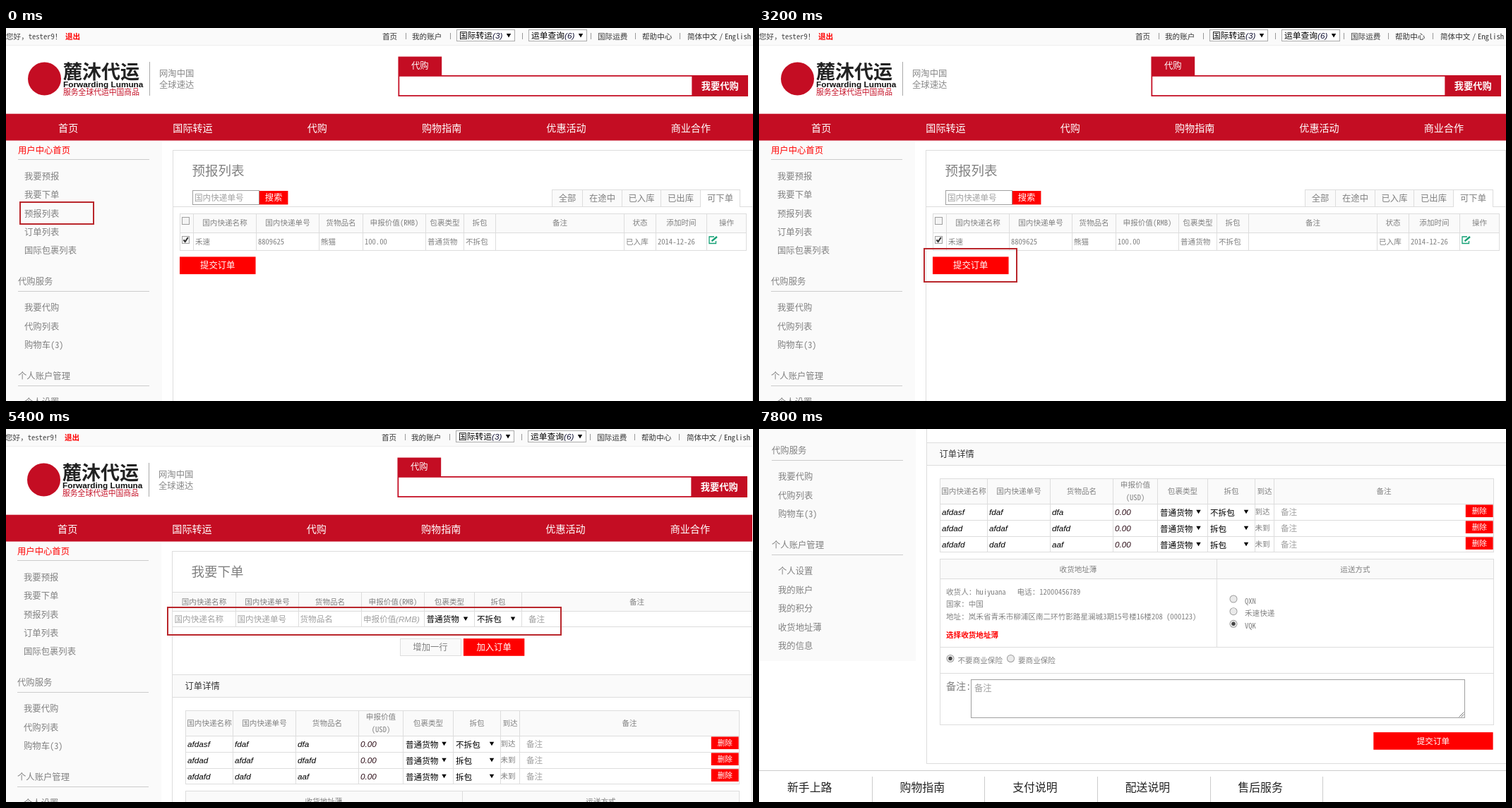
An HTML page with a canvas that plays this animation: 1058x529 px, repeating every 8 s.

```html
<!DOCTYPE html>
<html lang="zh-CN">
<head>
<meta charset="utf-8">
<style>
html, body { margin: 0; width: 100%; height: 100%; overflow: hidden; background: #fff; }
canvas { display: block; }
</style>
</head>
<body>
<canvas id="stage" width="1058" height="529"></canvas>
<script>
const ctx = document.getElementById('stage').getContext('2d');
const MONO = '"Noto Sans Mono CJK SC", "Noto Sans CJK SC", "Noto Sans CJK", monospace';
const SANS = '"Liberation Sans", "Noto Sans CJK SC", "Noto Sans CJK", sans-serif';
const BRAND = '#c40d23', RED = '#f00', GREY = '#808080', HINT = '#a0a0a0';
const LINE = '#ddd', PALE = '#fafafa';
// the web page is 1200 units wide, shown on 1058 pixels
const U = 1058 / 1200;
const S = 12 * U, M = 14 * U, L = 16 * U, FIELD = 11.6;

// y is the visual middle of the line
function text(str, x, y, size = S, color = GREY, { align = 'left', style = '', font = MONO } = {}) {
  ctx.font = `${style} ${size}px ${font}`;
  ctx.textAlign = align;
  ctx.fillStyle = color;
  ctx.fillText(str, x, y + size * 0.38);
}
const mid = (str, x, y, size, color, style) => text(str, x, y, size, color, { align: 'center', style });
const italic = (str, x, y, size, color) => text(str, x, y, size, color, { style: 'italic', font: SANS });

function rect(x0, y0, x1, y1, color) {
  ctx.fillStyle = color;
  ctx.fillRect(x0, y0, x1 - x0, y1 - y0);
}
function frame(x0, y0, x1, y1, color, w = 1) {
  ctx.strokeStyle = color;
  ctx.lineWidth = w;
  ctx.strokeRect(x0 + w / 2, y0 + w / 2, x1 - x0 - w, y1 - y0 - w);
}
const hline = (x0, x1, y, color = LINE) => rect(x0, y, x1, y + 1, color);
const vline = (x, y0, y1, color = LINE) => rect(x, y0, x + 1, y1, color);

// block and button take page units
const block = (x0, y0, x1, y1, color) => rect(x0 * U, y0 * U, x1 * U, y1 * U, color);
function button(label, x, y, w, h, size = M, color = RED, style = '') {
  block(x, y, x + w, y + h, color);
  mid(label, (x + w / 2) * U, (y + h / 2) * U, size, '#fff', style);
}
function grid(xs, ys) {
  const right = xs[xs.length - 1], bottom = ys[ys.length - 1];
  rect(xs[0], ys[0], right, ys[1], PALE);
  ys.forEach(y => hline(xs[0], right + 1, y));
  xs.forEach(x => vline(x, ys[0], bottom + 1));
}
function heads(labels, xs, y) {
  labels.forEach((s, i) => s && mid(s, (xs[i] + xs[i + 1] + 1) / 2, y));
}
function arrow(x, y) {
  ctx.fillStyle = '#000';
  ctx.beginPath();
  ctx.moveTo(x - 3.2, y - 2.5);
  ctx.lineTo(x + 3.2, y - 2.5);
  ctx.lineTo(x, y + 3);
  ctx.fill();
}
function select(label, x, arrowX, y) {
  text(label, x, y, FIELD, '#000');
  arrow(arrowX, y - 1);
}
function checkbox(x, y, on) {
  rect(x - 5, y - 5, x + 6, y + 6, '#f4f4f4');
  frame(x - 5, y - 5, x + 6, y + 6, '#a0a0a0');
  if (!on) return;
  ctx.strokeStyle = '#333';
  ctx.lineWidth = 2;
  ctx.beginPath();
  ctx.moveTo(x - 2.5, y + 0.5);
  ctx.lineTo(x - 0.3, y + 3);
  ctx.lineTo(x + 3.8, y - 3);
  ctx.stroke();
}
function disc(x, y, r, color) {
  ctx.fillStyle = color;
  ctx.beginPath();
  ctx.arc(x, y, r, 0, 7);
  ctx.fill();
}
function radio(x, y, on) {
  disc(x, y, 5.5, '#999');
  disc(x, y, 4.6, '#eaeaea');
  if (on) disc(x, y, 2.7, '#444');
}
function editIcon(x, y) {
  ctx.strokeStyle = '#12a074';
  ctx.lineWidth = 1.3;
  ctx.beginPath();
  ctx.moveTo(x + 8, y - 4.5);
  ctx.lineTo(x + 1, y - 4.5);
  ctx.lineTo(x + 1, y + 5);
  ctx.lineTo(x + 10.5, y + 5);
  ctx.lineTo(x + 10.5, y + 1.5);
  ctx.stroke();
  ctx.lineWidth = 2.4;
  ctx.beginPath();
  ctx.moveTo(x + 4.5, y + 1.8);
  ctx.lineTo(x + 12, y - 4.5);
  ctx.stroke();
}

function topBar() {
  rect(0, 0, 1058, 24, PALE);
  hline(0, 1058, 24, '#eee');
  text('您好，tester9！', 0, 11.5, S, '#444');
  text('退出', 84, 11.5, S, RED, { style: 'bold' });
  const links = [['首页', 533], ['我的账户', 575], ['国际运费', 838], ['帮助中心', 901],
    ['简体中文', 965], ['/', 1010], ['English', 1018]];
  links.forEach(([s, x]) => text(s, x, 11.5, S, '#333'));
  [566, 629, 731, 828, 891, 954].forEach(x => vline(x, 7, 16, '#999'));
  [['国际转运', '(3)', 638], ['运单查询', '(6)', 740]].forEach(([s, n, x]) => {
    rect(x, 2, x + 83, 19, '#fff');
    frame(x, 2, x + 83, 19, '#aaa');
    text(s, x + 4, 11, 11.73, '#000');
    italic(n, x + 51, 11, 11.73, '#113');
    arrow(x + 74, 10.5);
  });
}

function header() {
  topBar();
  disc(54.5, 72, 23.5, BRAND);
  text('麓沐代运', 81, 62, 27, '#222', { style: 'bold' });
  text('Forwarding Lumuna', 81, 80, 11.8, '#111', { style: 'bold', font: SANS });
  text('服务全球代运中国商品', 81, 90.5, 10.8, BRAND);
  vline(203, 48, 96, '#aaa');
  text('网淘中国', 217, 64.5, M, '#888');
  text('全球速达', 217, 80.5, M, '#888');

  button('代购', 630, 46, 70, 30, M, BRAND);
  block(630, 76, 1192, 110, BRAND);
  block(632, 78, 1102, 108, '#fff');
  button('我要代购', 1102, 76, 90, 34, 15 * U, BRAND, 'bold');

  block(0, 138, 1200, 181, BRAND);
  ['首页', '国际转运', '代购', '购物指南', '优惠活动', '商业合作']
    .forEach((s, i) => mid(s, (100 + 200 * i) * U, 141.3, L, '#fff'));
}

function sidebar() {
  rect(0, 160, 221, 658, PALE);
  const groups = [
    [173, '用户中心首页', '我要预报', '我要下单', '预报列表', '订单列表', '国际包裹列表'],
    [359.5, '代购服务', '我要代购', '代购列表', '购物车(3)'],
    [493.5, '个人账户管理', '个人设置', '我的账户', '我的积分', '收货地址薄', '我的信息']
  ];
  groups.forEach(([y, title, ...items], g) => {
    text(title, 17, y, M, g ? GREY : RED);
    hline(17, 203, Math.round(y + 13.4), '#ccc');
    items.forEach((s, i) => text(s, 26, y + 37 + 30 * U * i, M));
  });
}

function panel(title) {
  frame(236, 173, 1058, 804, LINE);
  text(title, 263.5, 202, 21 * U);
}

function listPage() {
  panel('预报列表');
  frame(264, 230, 359, 251, '#a0a0a0');
  text('国内快递单号', 267, 241, FIELD, HINT);
  button('搜索', 407, 262, 46, 22);

  hline(236, 1058, 253);
  const tabs = [773, 816, 872, 927, 983, 1039];
  ['全部', '在途中', '已入库', '已出库', '可下单'].forEach((s, i) => {
    const x0 = tabs[i], x1 = tabs[i + 1] + 1, active = i === 4;
    rect(x0, 229, x1, 254, active ? '#fff' : PALE);
    if (!active) hline(x0, x1, 253);
    hline(x0, x1, 229);
    vline(x0, 229, 254);
    vline(x1 - 1, 229, 254);
    mid(s, (x0 + x1) / 2, 241.5, M);
  });

  const xs = [246, 265, 354, 443, 505, 594, 648, 693, 875, 920, 992, 1048];
  grid(xs, [263, 290, 315]);
  heads(['', '国内快递名称', '国内快递单号', '货物品名', '申报价值(RMB)', '包裹类型', '拆包', '备注',
    '状态', '添加时间', '操作'], xs, 276);
  ['', '禾速', '8809625', '熊猫', '100.00', '普通货物', '不拆包', '', '已入库', '2014-12-26']
    .forEach((s, i) => text(s, xs[i] + 3, 302.5));
  checkbox(254, 273, false);
  checkbox(254, 300, true);
  editIcon(995, 300.5);
  button('提交订单', 279, 368, 122, 28);
}

function entryForm() {
  const xs = [236, 326, 415, 504, 593, 664, 731, 1057], y = 269.5;
  grid(xs, [231, 258, 280]);
  heads(['国内快递名称', '国内快递单号', '货物品名', '申报价值(RMB)', '包裹类型', '拆包', '备注'], xs, 244.5);
  text('国内快递名称', 239.5, y, FIELD, HINT);
  text('国内快递单号', 328.5, y, FIELD, HINT);
  text('货物品名', 417.5, y, FIELD, HINT);
  text('申报价值', 507, y, FIELD, HINT);
  italic('(RMB)', 553, y, 11.73, HINT);
  select('普通货物', 596.5, 652, y + 0.5);
  select('不拆包', 668, 719, y + 0.5);
  text('备注', 741, y, FIELD, HINT);

  rect(559, 297, 646, 322, PALE);
  frame(559, 297, 646, 322, LINE);
  mid('增加一行', 602, 309.5, M);
  button('加入订单', 736, 337, 98, 28);
}

function orderRows() {
  rect(237, 349, 1057, 381, PALE);
  hline(237, 1057, 348);
  hline(237, 1057, 380);
  text('订单详情', 254.5, 364.5, M, '#333');

  const xs = [255, 322, 411, 500, 563, 634, 701, 728, 1039];
  grid(xs, [399, 435, 458, 481, 503]);
  heads(['国内快递名称', '国内快递单号', '货物品名', '', '包裹类型', '拆包', '到达', '备注'], xs, 417);
  mid('申报价值', 532, 408);
  mid('(USD)', 532, 425.5);
  const rows = [
    ['afdasf', 'fdaf', 'dfa', '不拆包', '到达'],
    ['afdad', 'afdaf', 'dfafd', '拆包', '未到'],
    ['afdafd', 'dafd', 'aaf', '拆包', '未到']
  ];
  rows.forEach(([name, code, goods, unpack, state], i) => {
    const y = 446.8 + 26 * U * i;
    [name, code, goods].forEach((s, c) => italic(s, xs[c] + 3, y, 11.73, '#000'));
    italic('0.00', 503, y, 11.73, '#2a0a14');
    select('普通货物', 567, 621.5, y + 0.5);
    select(unpack, 638, 689, y + 0.5);
    text(state, 701.5, y - 0.5);
    text('备注', 738, y, FIELD, HINT);
    button('删除', 1134, 495 + 26 * i, 44, 20, S);
  });
}

function delivery() {
  rect(255, 513, 1039, 541, PALE);
  frame(255, 513, 1040, 749, LINE);
  [541, 638, 675].forEach(y => hline(255, 1039, y));
  vline(647, 513, 638);
  mid('收货地址薄', 451, 527.5);
  mid('运送方式', 843.5, 527.5);

  text('收货人：huiyuana   电话：12000456789', 264, 559.5);
  text('国家：中国', 264, 576.5);
  text('地址：岚禾省青禾市柳浦区南二环竹影路星澜城3期15号楼16楼208 (000123)', 264, 594.5);
  text('选择收货地址薄', 264, 620.5, S, RED, { style: 'bold' });
  ['QXN', '禾速快递', 'VQK'].forEach((s, i) => {
    radio(671, 570 + 20 * U * i, i === 2);
    text(s, 687, 572.5 + 20 * U * i);
  });

  radio(270, 654.5, true);
  text('不要商业保险', 280.5, 656.5);
  radio(355.5, 654.5, false);
  text('要商业保险', 366, 656.5);

  text('备注:', 264, 694, L);
  frame(299, 684, 999, 739, '#a0a0a0');
  text('备注', 304, 696.5, M, HINT);
  ctx.strokeStyle = '#777';
  ctx.lineWidth = 1;
  ctx.beginPath();
  [7, 4].forEach(d => {
    ctx.moveTo(997.5 - d, 737.5);
    ctx.lineTo(997.5, 737.5 - d);
  });
  ctx.stroke();
  button('提交订单', 986, 861, 192, 28, FIELD);
}

function footer() {
  hline(-1, 1058, 813, '#ccc');
  ['新手上路', '购物指南', '支付说明', '配送说明', '售后服务'].forEach((s, i) => {
    text(s, 39 + 181 * U * i, 836.5, 18 * U, '#222');
    vline(Math.round(158.8 + 181 * U * i), 822, 860, '#ccc');
  });
}

function orderPage() {
  panel('我要下单');
  entryForm();
  orderRows();
  delivery();
  footer();
}

function page(dx, scroll, content) {
  ctx.save();
  ctx.translate(dx, -scroll);
  header();
  sidebar();
  content();
  ctx.restore();
}

// start time, then the outer edges of each blinking marker
const markers = [
  [0, 19, 246, 125, 279],
  [1200, 973, 219, 1055, 266],
  [2400, 233, 312, 366, 361],
  [4200, 18, 219, 109, 253],
  [5400, 228, 252, 787, 293],
  [6600, 644, 283, 743, 337]
];
const LOOP = 8000, BLINK = 200;

function draw(t) {
  rect(0, 0, 1058, 529, '#fff');
  if (t < 3600) page(0, 0, listPage);
  else if (t < 7800) page(-1, 0, orderPage);
  else page(1, 329, orderPage);
  for (const [start, ...edges] of markers) {
    const n = Math.floor((t - start) / BLINK);
    if (n >= 0 && n < 6 && n % 2 === 0) frame(...edges, '#b9262b', 2);
  }
}

let last = -1;
function tick() {
  const step = Math.floor((performance.now() % LOOP) / BLINK);
  if (step !== last) draw(step * BLINK);
  last = step;
  requestAnimationFrame(tick);
}
tick();
</script>
</body>
</html>
```
